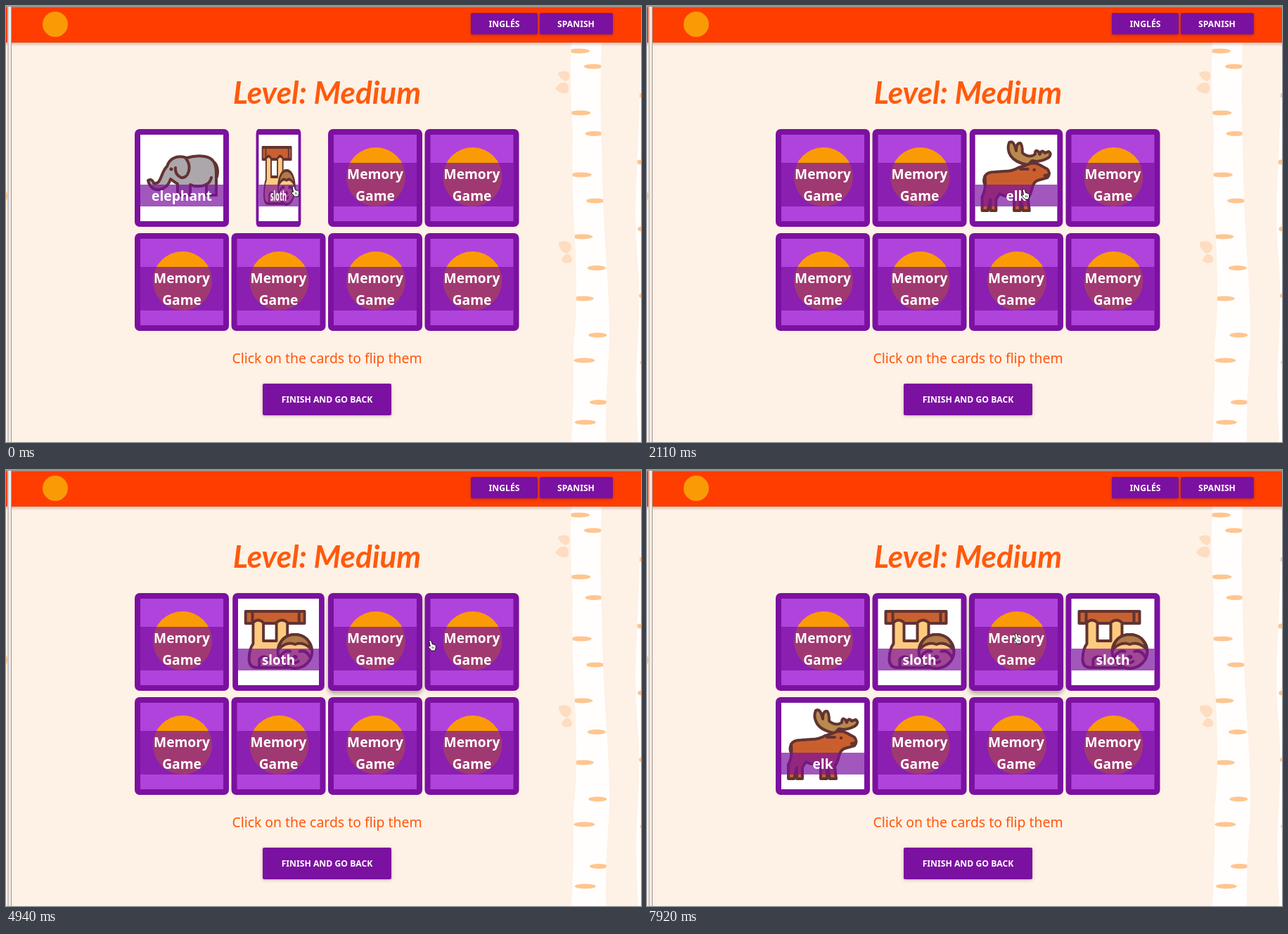
Animation of 903x620 px, one loop 8000 ms. Source, as an HTML page:

```html
<!DOCTYPE html>
<html lang="en">
<head>
<meta charset="utf-8">
<title>Memory game</title>
<style>
  html, body { margin: 0; height: 100%; overflow: hidden; background: #fef1e5; }
  svg { display: block; width: 100vw; height: 100vh; }
  text { font: 600 19.2px "Noto Sans", "Open Sans", sans-serif; fill: #fff; text-anchor: middle; }
  .title { font: italic 700 44px Lato, sans-serif; fill: #ff5a0c; }
  .hint { font-size: 19.4px; font-weight: 400; fill: #ff560a; }
  .button text { font-size: 12.2px; }
  .button rect { fill: #7b11a0; filter: drop-shadow(0 1px 2px rgba(0, 0, 0, .25)); }
  .bar { fill: #ff3d00; filter: drop-shadow(0 2px 2px rgba(0, 0, 0, .25)); }
  .mark { fill: #fa9b05; }
  .bark { fill: #ffc58f; }
  .leaf { fill: #fddcc1; }
  .frame { fill: #7b11a0; }
  .band { fill: #7b11a0; fill-opacity: .7; }
  .shadow { fill: #000; filter: blur(3px); }
  .animal { stroke: #623332; stroke-width: 4; stroke-linejoin: round; stroke-linecap: round; }
  .dot { fill: #623332; stroke: none; }
  .line { fill: none; }
</style>
</head>
<body>
<svg viewBox="0 0 903 620" preserveAspectRatio="none">
  <defs>
    <clipPath id="trunks">
      <path id="trunk" d="M804 52H847Q844 130 847 200Q849 300 853 350Q860 450 857 500Q852 560 853 620H804Q808 560 807 480Q814 430 809 330Q804 250 806 180Q801 110 804 52Z M903 60Q901 150 897 240Q893 300 898 360Q903 420 897 500Q895 560 899 620H903Z"/>
    </clipPath>

    <g id="elephant" class="animal" fill="#aba7aa">
      <path d="M46 53C50 40 62 37 74 41Q87 37 100 39C113 41 116 51 116 64V94H102V79Q89 84 79 79V94H61V78Q56 75 51 71C45 91 22 91 19 73Q25 70 27 77C38 80 37 61 46 53Z"/>
      <path class="line" d="M73 42C82 54 76 71 66 69Q57 65 58 55M114 48Q120 56 117 68M101 79Q107 77 109 69"/>
      <circle class="dot" cx="52" cy="57" r="2.5"/>
    </g>

    <g id="sloth" class="animal" fill="#fdcb7e">
      <path fill="#c9602f" d="M19 26H105V43H19Z"/>
      <path class="line" d="M29 27V42M97 27V42"/>
      <path d="M30 42Q37 35 45 42V68H64V42Q72 35 80 42V66L90 106H36Q24 106 24 94Q24 80 30 72Z"/>
      <path class="line" d="M39 106V94Q46 87 54 95"/>
      <ellipse cx="91" cy="83" rx="25" ry="24"/>
      <path fill="#b17a47" d="M67 80Q71 59 91 59T115 80Q103 68 91 73Q79 68 67 80Z"/>
      <path class="line" d="M69 91Q76 80 84 83M98 83Q107 80 113 91M86 97Q91 101 96 97"/>
      <ellipse class="dot" cx="91" cy="91" rx="4" ry="3"/>
    </g>

    <g id="elk" class="animal" fill="#ca5f2d">
      <path fill="#b98a4e" d="M84 51Q66 48 59 38Q53 28 57 19Q62 16 65 24L67 31Q67 19 73 20Q76 22 76 34Q86 42 94 36Q94 28 99 32L101 36Q104 28 108 34L114 32Q119 36 113 41Q100 48 90 45Z"/>
      <path d="M22 67Q25 61 36 61L50 60Q62 60 70 55L82 51Q92 46 101 51L112 57Q117 63 112 69L98 73Q92 75 90 84Q87 95 84 98L86 116H77L73 98V116H64V95Q52 97 43 92L38 100V116H30V100L26 116H18V96Q24 86 22 67Z"/>
      <path class="line" d="M22 67Q19 74 22 79M73 57L84 57M108 66L113 65"/>
      <circle class="dot" cx="93" cy="58" r="2.3"/>
    </g>
  </defs>

  <rect width="903" height="620" fill="#fef1e5"/>
  <use href="#trunk" fill="#fffefd"/>
  <g id="bark" class="bark" clip-path="url(#trunks)"></g>
  <g class="leaf">
    <path d="M785 95Q797 90 801 96Q803 104 796 107Q787 104 785 95ZM781 117Q788 106 798 110Q803 119 797 124Q786 125 781 117Z"/>
    <path d="M786 336Q800 331 804 341Q804 349 797 352Q786 348 786 336ZM790 362Q792 352 800 353Q806 357 805 363Q797 369 790 362Z"/>
  </g>

  <rect class="bar" x="-4" y="1" width="911" height="51"/>
  <rect width="903" height="2" fill="#a08d82"/>
  <rect x="2" y="1" width="6" height="619" fill="#f2ece8"/>
  <path d="M3 1V620M7.5 1V620" stroke="#a39b97"/>
  <ellipse class="bark" cx="0" cy="270" rx="2" ry="6"/>
  <circle class="mark" cx="70" cy="26" r="18"/>

  <g class="button">
    <rect x="661" y="10" width="95" height="30.5" rx="2"/><text x="708.5" y="30">INGLÉS</text>
    <rect x="759" y="10" width="104" height="30.5" rx="2"/><text x="810.5" y="30">SPANISH</text>
    <rect x="365" y="537" width="183" height="45" rx="2"/><text x="456.5" y="564">FINISH AND GO BACK</text>
  </g>
  <text class="title" x="456.5" y="139">Level: Medium</text>
  <text class="hint" x="456.5" y="508">Click on the cards to flip them</text>

  <g id="board"></g>

  <g id="hand" stroke="#111" stroke-linejoin="round">
    <path fill="#fff" d="M-4-7Q-2-9-.5-6L.5-2.5 4-1.5Q6.5-.5 5.5 3L4.5 7H-.5L-5 2Q-5.5-.5-2.5.5Z"/>
    <path fill="none" stroke-width=".7" d="M.5 1V4M2.5 1.5V4"/>
  </g>
  <path id="arrow" d="M0-7V5L3 2 5.5 7 7.5 6 5 1.5H9Z" stroke="#fff"/>
</svg>

<script>
  const LOOP = 8000, TICK = 149.15, TICK_OFFSET = 14;
  const FLIP = 600, GLIDE = 500, FADE = 250;
  const WIDTH = 134, HEIGHT = 139, PITCH_X = 137.5, PITCH_Y = 148;
  const byId = id => document.getElementById(id);
  const clamp = v => Math.min(1, Math.max(0, v));
  const show = (node, on) => node.setAttribute("visibility", on ? "visible" : "hidden");

  // Each card that turns: its face and the times it flips open, shut, open.
  const cards = [
    { face: "elephant", flips: [-2000, 760] },
    { face: "sloth", flips: [-230, 760, 4532] },
    { face: "elk", flips: [1666, 3860] },
    { face: "sloth", flips: [2860, 3860, 5470] },
    { face: "elk", flips: [7140] },
    {}, {}, {}
  ];

  // The pointer glides to each place, leaving at the given time.
  const start = { x: 411, y: 264 };
  const moves = [
    { leave: 760, x: 538, y: 268 },
    { leave: 2400, x: 658, y: 259 },
    { leave: 3850, x: 390, y: 250 },
    { leave: 4580, x: 660, y: 250 },
    { leave: 5950, x: 246, y: 372 },
    { leave: 7419, x: 527, y: 240 }
  ];

  // Bark marks repeat along a trunk edge that leans slightly outwards.
  function addBark(x, top, gap, radius) {
    for (let y = top; y < 620; y += gap) {
      byId("bark").innerHTML +=
        `<ellipse cx="${x + (y - top) / 60}" cy="${y}" rx="${radius}" ry="3.5"/>`;
    }
  }
  addBark(815, 64, 88, 15);
  addBark(835, 86, 95.5, 13);
  addBark(900, 127, 95, 5);

  const panel = (fill, art, bandY, bandH) => `
    <rect class="frame" width="${WIDTH}" height="${HEIGHT}" rx="7"/>
    <rect x="8" y="8" width="118" height="123" fill="${fill}"/>${art}
    <rect class="band" x="8" y="${bandY}" width="118" height="${bandH}"/>`;
  const label = (text, y) => `<text x="${WIDTH / 2}" y="${y}">${text}</text>`;

  const backArt = panel("#b043dc", '<circle class="mark" cx="68" cy="68" r="42"/>', 48, 62) +
    label("Memory", 71) + label("Game", 102);
  const frontArt = face => panel("#fff", `<use href="#${face}"/>`, 79, 31) + label(face, 102);

  cards.forEach((card, i) => {
    card.x = 183 + i % 4 * PITCH_X;
    card.y = 175 + (i >> 2) * PITCH_Y;
    const node = document.createElementNS("http://www.w3.org/2000/svg", "g");
    node.setAttribute("transform", `translate(${card.x} ${card.y})`);
    node.innerHTML = `
      <g><rect class="shadow" y="4" width="${WIDTH}" height="${HEIGHT}" rx="8"/>${backArt}</g>
      <g>${card.face ? frontArt(card.face) : ""}</g>`;
    [card.back, card.front] = node.children;
    card.shadow = node.querySelector(".shadow");
    byId("board").append(node);
  });

  // cubic-bezier(.25, .1, .25, 1), solved by bisection
  function ease(x) {
    if (x <= 0 || x >= 1) return clamp(x);
    const curve = (s, a, b) => 3 * s * (1 - s) ** 2 * a + 3 * s * s * (1 - s) * b + s ** 3;
    let low = 0, high = 1;
    for (let i = 0; i < 20; i++) {
      const mid = (low + high) / 2;
      if (curve(mid, .25, .25) < x) low = mid; else high = mid;
    }
    return curve(low, .1, 1);
  }

  // Signed width of a turning card: 1 is the back, -1 the front.
  function facing({ flips = [] }, t) {
    const turn = flips.reduce((sum, at, i) => sum + (-1) ** i * ease((t - at) / FLIP), 0);
    return Math.cos(Math.PI * turn);
  }

  function pointerAt(t) {
    return moves.reduce((from, to) => {
      const u = clamp((t - to.leave) / GLIDE), k = u * u * (3 - 2 * u);
      return { x: from.x + (to.x - from.x) * k, y: from.y + (to.y - from.y) * k };
    }, start);
  }

  function isOver(card, t) {
    const { x, y } = pointerAt(t);
    const half = WIDTH / 2 * Math.abs(facing(card, t));
    return Math.abs(x - card.x - WIDTH / 2) < half && y > card.y && y < card.y + HEIGHT;
  }

  // A hover shadow grows with the share of recent time spent under the pointer.
  function liftOf(card, t) {
    const samples = 10;
    let hits = 0;
    for (let i = 0; i < samples; i++) hits += isOver(card, t - i * FADE / samples);
    return hits / samples;
  }

  function drawCard(card, t) {
    const width = facing(card, t), scale = Math.abs(width);
    const shown = width > 0 ? card.back : card.front;
    shown.setAttribute("transform", `translate(${WIDTH / 2 * (1 - scale)} 0) scale(${scale} 1)`);
    show(card.back, shown === card.back);
    show(card.front, shown === card.front);
    card.shadow.setAttribute("opacity", .45 * liftOf(card, t));
  }

  function drawPointer(t) {
    const { x, y } = pointerAt(t);
    const overCard = cards.some(card => isOver(card, t));
    for (const id of ["hand", "arrow"]) {
      byId(id).setAttribute("transform", `translate(${x} ${y})`);
      show(byId(id), overCard === (id === "hand"));
    }
  }

  // The screen refreshes in coarse ticks, so motion is sampled on them.
  function draw() {
    const now = performance.now() % LOOP;
    const t = Math.max(0, TICK_OFFSET + Math.floor((now - TICK_OFFSET) / TICK) * TICK);
    cards.forEach(card => drawCard(card, t));
    drawPointer(t);
    requestAnimationFrame(draw);
  }
  draw();
</script>
</body>
</html>
```
